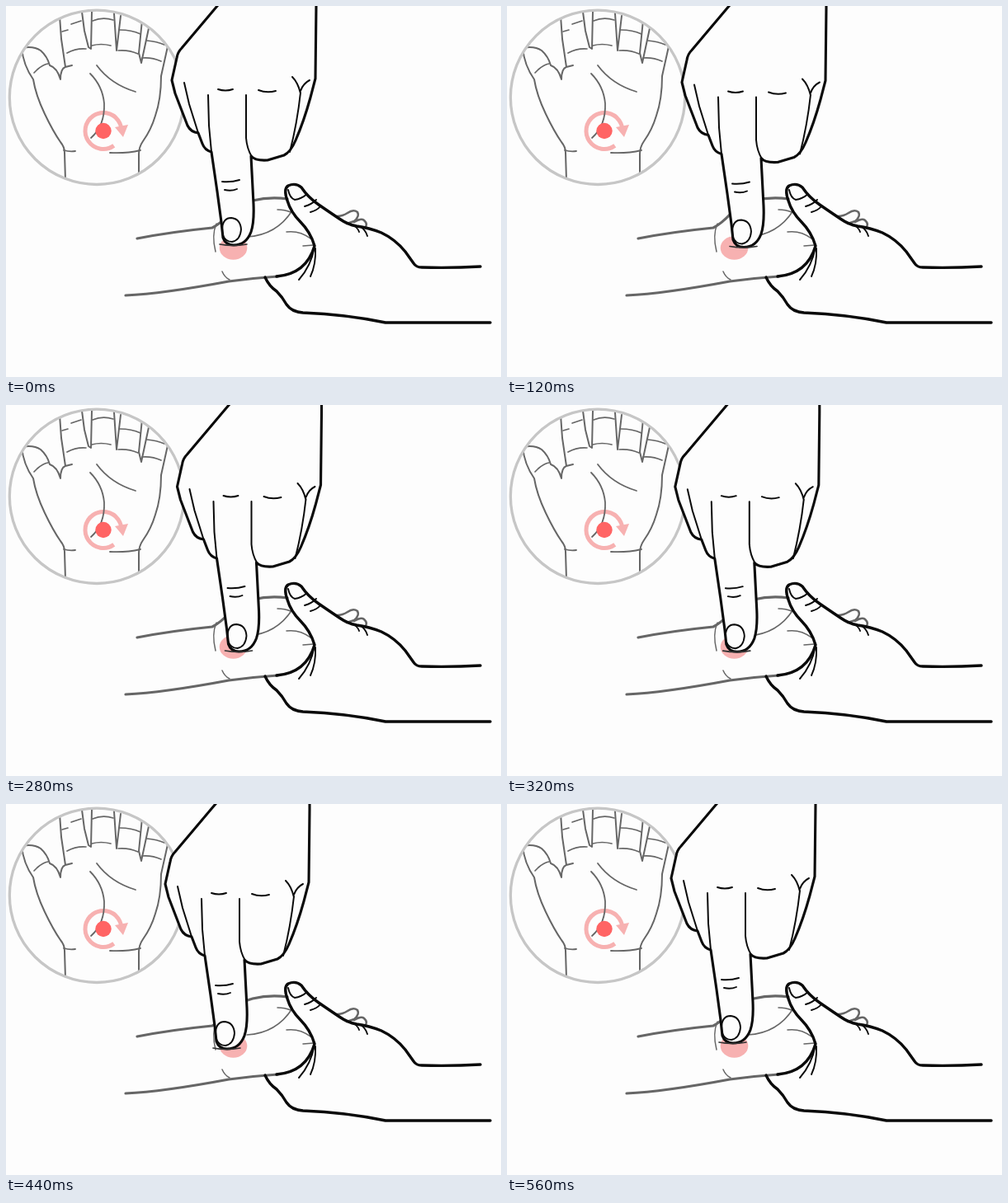
Write an HTML page with a canvas that moves like this. It is 600 by 450 pixels and loops after 0.6 s.

```html
<!DOCTYPE html>
<html lang="en">
<head>
<meta charset="utf-8">
<title>Wrist massage</title>
<style>
  html, body { margin: 0; width: 100%; height: 100%; overflow: hidden; background: #fdfdfd; }
  canvas { display: block; width: 600px; height: 450px; }
</style>
</head>
<body>
<canvas id="stage" width="600" height="450"></canvas>
<script>
const ctx = document.getElementById('stage').getContext('2d');
const PAPER = '#fdfdfd', INK = '#0a0a0a', GREY = '#666', PINK = '#f7b1b1', RED = '#ff6464';
const STEP = 40;

// Offsets of the pressing hand along its circular rub, one per step
const rubX = [0, 3.5, 7, 11, 14.3, 13.5, 10.3, 6.5, 2.8, -1, -4.8, -8, -9.3, -5.5, -2];
const rubY = [0, 0.2, 1, 2.5, 4.7, 7, 8.3, 9, 9.2, 9, 8.3, 7, 4.5, 1.8, 0];

const path = (...parts) => new Path2D(parts.join(' '));

const inset = {
  outline: path(
    'M19 51 Q21 72 33 89 Q36 108 47 131 Q57 152 66 165 Q71 171 71 178 L72 212',
    'M19 51 Q33 48 42 54 Q50 61 53 72 Q62 75 66 89 Q66 76 72 74 L80 72',
    'M65 12 L67 40 72 74',
    'M92 7 L95 30 100 50 L103 52 104 7',
    'M131 9 L134 54 139 12',
    'M165 17 L161 57 164 69 173 27',
    'M196 49 L188 85 Q188 113 181 133 Q176 150 166 164 Q161 171 161 180 L161 205'),
  creases: path(
    'M34 81 L38 77 M38 77 Q45 71 51 70',
    'M68 31 L75 29 M79 22 L91 18 M74 57 Q85 51 97 52',
    'M105 18 Q117 13 130 17 M104 48 Q115 45 127 48',
    'M138 29 Q152 29 163 34 M136 54 Q149 53 160 58',
    'M171 42 Q183 43 192 47 M165 63 Q177 62 188 67'),
  palm: path(
    'M102 82 Q117 97 119 118 Q120 145 103 160',
    'M110 72 Q127 95 157 104',
    'M70 175 Q77 177 84 176 M126 178 Q146 179 163 175'),
  arrowHead: path('M132 147 L148 144 142 159 Z')
};

const wrist = {
  arm: path(
    'M159 282 Q200 274 250 269 Q260 264 271 252 Q283 240 299 236 Q320 231 341 234',
    'M145 351 Q190 349 270 334 Q300 330 329 328'),
  folds: path(
    'M255 264 Q249 278 254 298',
    'M262 322 Q265 329 271 332',
    'M292 280 Q328 278 347 248',
    'M329 247 Q338 247 345 250',
    'M340 274 Q356 272 369 282',
    'M360 291 L373 290'),
  farFingers: path(
    'M401 255 Q408 255 414 251 Q421 246 426 250 Q429 255 422 261 L413 264',
    'M422 262 Q432 256 435 261 Q438 264 436 268')
};

const holder = {
  outline: path(
    'M328 328 Q364 325 374 291 Q369 274 357 262 Q345 250 341 236 Q336 222 342 218 Q351 214 358 220',
    'Q366 232 379 241 Q395 252 404 258 Q414 265 425 267 Q440 269 455 275 Q472 283 484 298',
    'L494 312 Q497 317 504 317 Q540 318 575 316',
    'M314 329 Q319 340 328 346 Q335 353 340 362 Q346 371 360 372 Q412 374 460 384 L587 384'),
  details: path(
    'M342 223 Q344 233 350 235 Q358 234 365 228',
    'M362 243 Q370 241 376 235 M369 250 Q377 248 381 243',
    'M419 265 Q426 268 428 274 M430 268 Q436 272 438 279',
    'M374 292 Q370 315 355 332 M375 294 Q376 313 369 328')
};

const presser = {
  outline: path(
    'M273 -20 L256 0 213 51 Q208 56 207 63 L201 90 205 106 220 145 Q224 153 233 154',
    'L238 167 Q241 175 249 177 L256 225 261 262 263 281 Q266 290 276 290 Q291 290 297 274',
    'Q301 262 300 240 L297 182 Q302 188 317 187 L337 181 Q345 177 351 163 Q361 140 369 111',
    'L375 88 376 0 376 -20'),
  inner: path(
    'M216 93 L222 119 233 154',
    'M245 108 L246 145 249 177',
    'M291 108 L291 160 Q292 173 298 183',
    'M347 86 Q354 93 357 106 M368 90 Q360 94 357 103',
    'M357 105 Q353 142 344 177'),
  details: path(
    'M257 101 Q266 104 275 101 M306 102 Q316 106 327 103',
    'M262 213 Q273 214 283 211 M265 223 Q273 225 280 222',
    'M262 270 Q263 257 273 257 Q284 258 285 271 Q284 284 274 286 Q266 286 263 278'),
  dent: path('M259 289 Q275 292 292 289')
};

function stroke(shape, width, color) {
  ctx.lineWidth = width;
  ctx.strokeStyle = color;
  ctx.stroke(shape);
}

function fill(shape, color) {
  ctx.fillStyle = color;
  ctx.fill(shape);
}

function ellipse(x, y, rx, ry = rx, from = 0, to = Math.PI * 2) {
  const shape = new Path2D();
  shape.ellipse(x, y, rx, ry, 0, from, to);
  return shape;
}

function drawInset() {
  const frame = ellipse(110, 110.8, 105.7);
  ctx.save();
  ctx.clip(frame);
  stroke(inset.outline, 2, GREY);
  stroke(inset.creases, 1.7, GREY);
  ctx.lineCap = 'butt';
  stroke(ellipse(118, 151.5, 22, 22, 0.95, 6.05), 5, PINK);
  ctx.lineCap = 'round';
  fill(inset.arrowHead, PINK);
  stroke(inset.palm, 1.8, GREY);
  fill(ellipse(118, 151.5, 9.7), RED);
  ctx.restore();
  stroke(frame, 3.3, '#c6c6c6');
}

function drawWrist() {
  stroke(wrist.arm, 3.2, GREY);
  stroke(wrist.folds, 1.5, GREY);
  stroke(wrist.farFingers, 2.6, GREY);
  fill(ellipse(275.5, 293.5, 16.8, 14.3), PINK);
  stroke(holder.outline, 3.4, INK);
  stroke(holder.details, 1.9, INK);
}

function drawPresser(x, y) {
  ctx.save();
  ctx.translate(x, y);
  fill(presser.outline, PAPER);
  stroke(presser.outline, 3.1, INK);
  stroke(presser.inner, 2, INK);
  stroke(presser.details, 1.9, INK);
  stroke(presser.dent, 1.7, '#333');
  ctx.restore();
}

function render(now) {
  const step = Math.floor(now / STEP) % rubX.length;
  ctx.fillStyle = PAPER;
  ctx.fillRect(0, 0, 600, 450);
  drawInset();
  drawWrist();
  drawPresser(rubX[step], rubY[step]);
}

ctx.lineCap = ctx.lineJoin = 'round';
let start;
function tick(now) {
  start ??= now;
  render(now - start);
  requestAnimationFrame(tick);
}
render(0);
requestAnimationFrame(tick);
</script>
</body>
</html>
```
